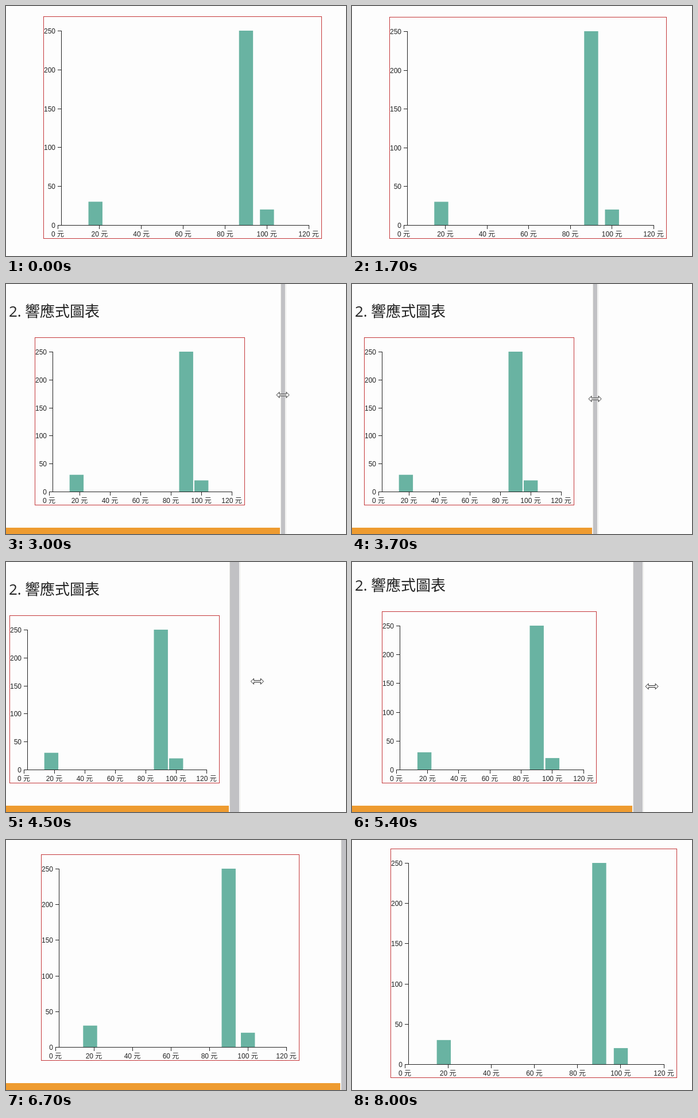
These frames come from a looping animation (592 px wide and 436 px high, 9000 ms). An HTML page:

```html
<!DOCTYPE html>
<html lang="zh-Hant">
<head>
<meta charset="utf-8">
<title>響應式圖表</title>
<style>
  html, body { margin: 0; width: 100%; height: 100%; overflow: hidden; background: #fdfdfd; }
  svg { display: block; width: 592px; height: 436px; }
  text { fill: #222; font: 12px "Liberation Sans", "Noto Sans CJK TC", "Noto Sans CJK", sans-serif; }
  .title { font: 26px "Open Sans", sans-serif; }
  .title.cjk { font: 300 26px "Noto Sans CJK TC", "Noto Sans CJK", sans-serif; }
  .end { text-anchor: end; }
  .mid { text-anchor: middle; }
  .axis, .frame { fill: none; shape-rendering: crispEdges; }
  .axis { stroke: #222; }
  .frame { stroke: #c4373a; }
  .bar { fill: #69b3a2; }
  .footer { fill: #ee9b30; }
  .scroll { fill: #c1c1c4; }
  .seam { fill: #e8e8e4; }
  .cursor { fill: #fdfdfd; stroke: #222; }
</style>
</head>
<body>
<svg id="stage" viewBox="0 0 592 436"></svg>
<script>
const LOOP = 9000, STEP = 100, HEIGHT = 436;
const stage = document.getElementById('stage');

// Pane width at the turning points of the drag: [ms, px]
const drag = [[1680, 626], [3000, 477], [4200, 376], [4500, 388], [5400, 488], [6700, 582.8], [7600, 644]];
const bars = [[18, 30], [90, 250], [100, 20]];

function paneAt(t) {
  const next = drag.findIndex(([time]) => t <= time);
  if (next < 1) return drag.at(next)[1];
  const [t0, a] = drag[next - 1], [t1, b] = drag[next];
  return a + (b - a) * (t - t0) / (t1 - t0);
}

const rect = (x, y, w, h, cls) =>
  `<rect x="${x}" y="${y}" width="${w}" height="${h}" class="${cls}"/>`;
const text = (x, y, cls, s) => `<text x="${x}" y="${y}" class="${cls}">${s}</text>`;
const px = v => Math.floor(v) + 0.5;

function chart(x, y, w, h) {
  const left = x + 25, top = y + 25, base = y + h - 23;
  const sx = v => left + (w - 47) * v / 120;
  const sy = v => base - (base - top) * v / 250;
  let out = rect(x + 0.5, y + 0.5, w, h, 'frame');
  for (const [price, n] of bars)
    out += rect(sx(price) - 12, sy(n), 24.4, base - sy(n), 'bar');

  let path = `M${px(x + 31)} ${top}V${base + 1}M${left} ${px(base)}H${px(sx(120)) + 0.5}`;
  for (let v = 0; v <= 250; v += 50) {
    const ty = Math.round(sy(v));
    path += `M${left} ${px(ty)}h6`;
    out += text(x + 21, ty + 5, 'end', v);
  }
  for (let v = 0; v <= 120; v += 20) {
    path += `M${px(sx(v))} ${base}v7`;
    out += text(sx(v), base + 20, 'mid', v + ' 元');
  }
  return out + `<path class="axis" d="${path}"/>`;
}

function scene(t) {
  const pane = paneAt(t), edge = Math.floor(pane);
  const fullW = Math.max(365, 0.8 * pane - 17), fullH = 0.8 * fullW;
  const w = Math.round(fullW), h = Math.round(fullH);
  const x = Math.round((pane - w) / 2 - 6);
  // Page scroll is clamped at its end once the chart gets short.
  const y = Math.round(Math.max(18.4 - (pane - 626) * 0.164, 384.8 - fullH));

  // The pane trails the pointer when it is dragged wider.
  const cx = Math.max(pane, paneAt(t + 400)) + 5;
  const cy = 193.5 + (t - 3000) * 0.0098;
  const scrollEnd = Math.min(edge + 18, Math.round(cx + 4));

  return text(5, y - 36, 'title', '2.') + text(33, y - 36, 'title cjk', '響應式圖表') +
    chart(x, y, w, h) +
    rect(0, y + h + 40, edge, 60, 'footer') +
    rect(edge + 1, 0, 1, HEIGHT, 'seam') +
    rect(edge + 2, 0, scrollEnd - edge - 2, HEIGHT, 'scroll') +
    rect(scrollEnd + 1, 0, 1, HEIGHT, 'seam') +
    `<path class="cursor" transform="translate(${cx} ${cy})"
      d="M-11 0L-6-5V-1.5H6V-5L11 0L6 5V1.5H-6V5Z"/>`;
}

const start = performance.now();
let shown = -1;
function tick() {
  const t = Math.floor((performance.now() - start) % LOOP / STEP) * STEP;
  if (t !== shown) {
    stage.innerHTML = scene(t);
    shown = t;
  }
  requestAnimationFrame(tick);
}
tick();
</script>
</body>
</html>
```
